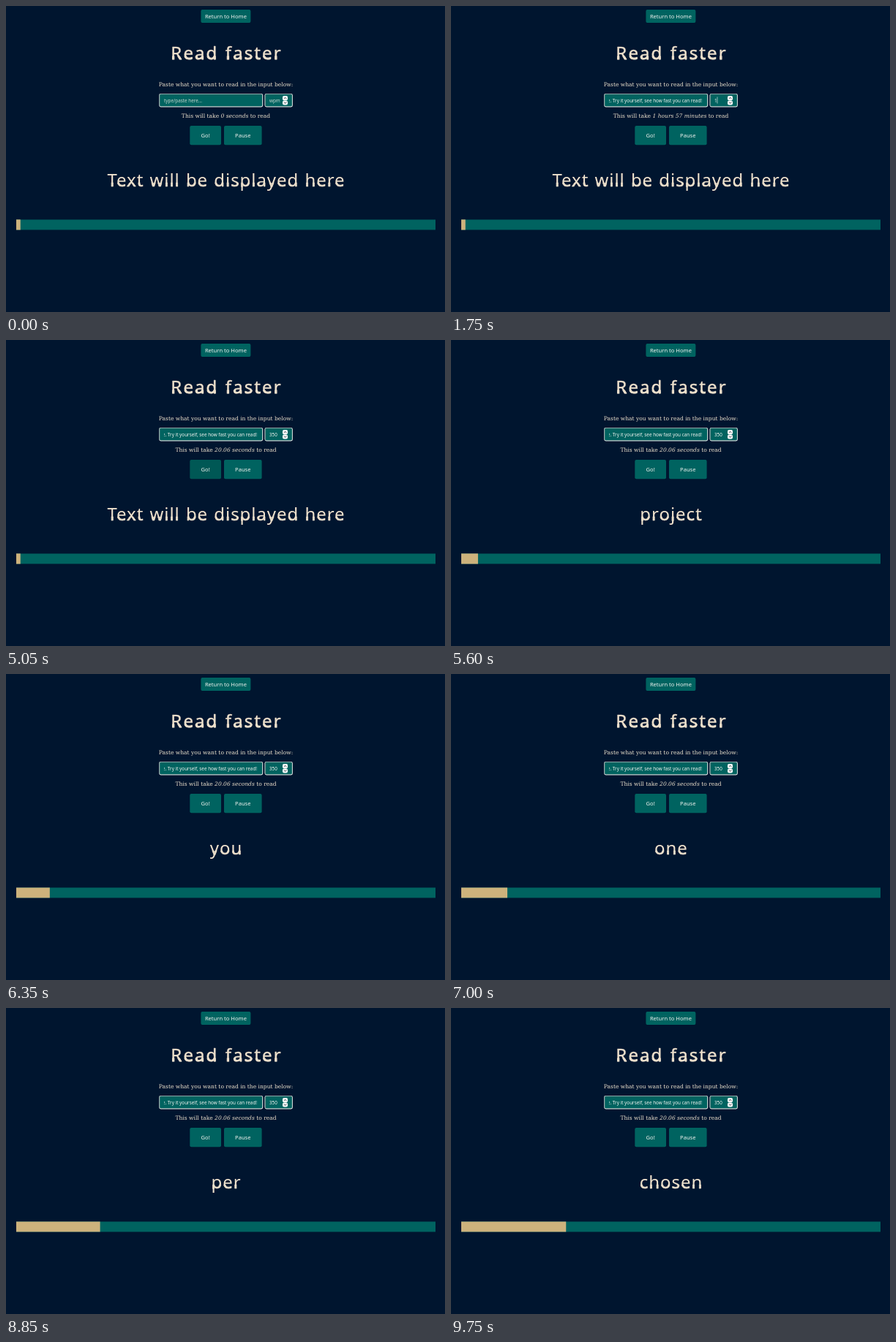
Write an HTML page with a canvas that moves like this. It is 600 px wide and 419 px high and loops after 9.8 s.

```html
<!DOCTYPE html>
<html lang="en">
<head>
<meta charset="utf-8">
<title>Read faster</title>
<style>
  html, body { margin: 0; width: 100%; height: 100%; overflow: hidden; background: #00152f; }
  canvas { display: block; width: 600px; height: 419px; }
</style>
</head>
<body>
<canvas id="stage"></canvas>
<script>
const W = 600, H = 419, LOOP = 9800, TICK = 50, MID = 300.5;
const BG = '#00152f', TEAL = '#006360', CREAM = '#eee0cc', TAN = '#cdb27c', WHITE = '#f4f4f0', HINT = '#c9d6cf';
const SANS = '"Noto Sans", sans-serif', SERIF = '"DejaVu Serif", serif';
const SMALL = '6.34px ' + SANS, LABEL = '7.58px ' + SANS, BODY = '7.56px ' + SERIF;

const START = 4961, WORD_MS = 60000 / 350, PERCENT_MS = 200;
const words = ('This is a project that should help you to process it one word at a time at the ' +
  'speed in words per minute that the reader has chosen').split(' ');
const pasted = 'e. Try it yourself, see how fast you can read!';

// Each state holds from its time until the next one; caret is an x position.
const states = [
  { at: 0, typed: '', wpm: '', time: '0 seconds', caret: 0 },
  { at: 150, caret: 216 },
  { at: 800, typed: pasted, caret: 344 },
  { at: 1250, caret: 0 },
  { at: 1350, wpm: '1', time: '1 hours 57 minutes' },
  { at: 1750, caret: 364 },
  { at: 2450, wpm: '', time: '0 seconds', caret: 360 },
  { at: 2950, caret: 0 },
  { at: 3000, wpm: '3', time: '39 minutes', caret: 364 },
  { at: 3650, wpm: '35', time: '3 minutes', caret: 367.6 },
  { at: 3800, wpm: '350', time: '20.06 seconds', caret: 371 },
  { at: 4150, caret: 0 }
];

const canvas = document.getElementById('stage');
const ctx = canvas.getContext('2d');
const ratio = window.devicePixelRatio || 1;
canvas.width = W * ratio;
canvas.height = H * ratio;

function box(x, y, w, h, r, color) {
  ctx.fillStyle = color;
  ctx.beginPath();
  ctx.roundRect(x, y, w, h, r);
  ctx.fill();
}

function text(str, x, y, font, color, align = 'left') {
  ctx.font = font;
  ctx.fillStyle = color;
  ctx.textAlign = align;
  ctx.fillText(str, x, y);
}

// Lettering that is heavier towards the baseline.
function weighted(str, y, spacing, stroke) {
  const size = 24, x = MID + spacing / 2;
  ctx.save();
  ctx.letterSpacing = spacing + 'px';
  ctx.wordSpacing = '1px';
  text(str, x, y, size + 'px ' + SANS, CREAM, 'center');
  ctx.strokeStyle = CREAM;
  ctx.lineJoin = 'round';
  if (stroke) {
    ctx.lineWidth = stroke;
    ctx.strokeText(str, x, y);
  }
  ctx.beginPath();
  ctx.rect(0, y - size * 0.2, W, size * 0.25);
  ctx.clip();
  ctx.lineWidth = stroke + 0.8;
  ctx.strokeText(str, x, y);
  ctx.restore();
}

function button(label, x, y, w, h, base, color = TEAL) {
  box(x, y, w, h, 2, color);
  text(label, x + w / 2, base, LABEL, WHITE, 'center');
}

// Inset border: dark on the top and left, light on the bottom and right.
function field(x, w) {
  const y = 120, h = 18.4;
  box(x, y, w, h, 2.4, '#e0e6e4');
  box(x, y, w - 1, h - 1, 2.2, '#94a4a4');
  box(x + 1.1, y + 1.1, w - 2.2, h - 2.2, 1.4, TEAL);
}

function chevron(y, dir) {
  ctx.strokeStyle = '#1b2430';
  ctx.lineWidth = 0.9;
  ctx.beginPath();
  ctx.moveTo(379.8, y);
  ctx.lineTo(381.6, y + 1.6 * dir);
  ctx.lineTo(383.4, y);
  ctx.stroke();
}

function fields(s) {
  field(209.2, 142);
  field(353.6, 38.3);
  if (s.typed) {
    ctx.save();
    ctx.beginPath();
    ctx.rect(216, 121, 130, 16);
    ctx.clip();
    text(s.typed, 343, 131.6, SMALL, WHITE, 'right');
    ctx.restore();
  } else {
    text('type/paste here...', 216, 131.6, SMALL, HINT);
  }
  text(s.wpm || 'wpm', 360, 131.6, SMALL, s.wpm ? WHITE : HINT);
  box(378, 123, 7, 6.2, 2, '#fff');
  box(378, 129.4, 7, 6.2, 2, '#fff');
  chevron(127, -1);
  chevron(131.6, 1);
  if (s.caret) box(s.caret - 0.3, 124.5, 0.6, 9, 0, WHITE);
}

function summary(time) {
  const parts = [['This will take ', BODY], [time, 'italic ' + BODY], [' to read', BODY]];
  const widths = parts.map(([str, font]) => {
    ctx.font = font;
    return ctx.measureText(str).width;
  });
  let x = MID - widths.reduce((a, b) => a + b) / 2;
  parts.forEach(([str, font], i) => {
    text(str, x, 153, font, CREAM);
    x += widths[i];
  });
}

function goColor(t) {
  const p = (t - 4700) / 400;
  if (p <= 0 || p >= 1) return TEAL;
  const k = 1 - 0.3 * Math.sin(Math.PI * p);
  return `rgb(0, ${Math.round(99 * k)}, ${Math.round(96 * k)})`;
}

function draw(t) {
  const s = Object.assign({}, ...states.filter(e => e.at <= t));
  const index = Math.floor((t + TICK - 0.1 - START) / WORD_MS);
  const percent = Math.max(1, Math.floor((t - 4950) / PERCENT_MS) + 1);
  const shown = index < 1 ? 'Text will be displayed here' : words[Math.min(index, words.length) - 1];

  ctx.setTransform(ratio, 0, 0, ratio, 0, 0);
  box(0, 0, W, H, 0, BG);
  button('Return to Home', 266.4, 4.9, 68, 18.2, 17);
  weighted('Read faster', 73.4, 2.1, 0.4);
  text('Paste what you want to read in the input below:', MID, 110.4, BODY, CREAM, 'center');
  fields(s);
  summary(s.time);
  button('Go!', 251.3, 164.1, 42.7, 26.1, 180, goColor(t));
  button('Pause', 298, 164.1, 51.6, 26.1, 180);
  weighted(shown, 246.6, 0.95, 0);

  box(14, 292.4, 573, 14.2, 0, TEAL);
  box(14, 292.4, 5.73 * percent, 14.2, 0, TAN);
}

const begin = performance.now();
function frame() {
  const t = (performance.now() - begin) % LOOP;
  draw(Math.floor(t / TICK) * TICK);
  requestAnimationFrame(frame);
}
frame();
</script>
</body>
</html>
```
